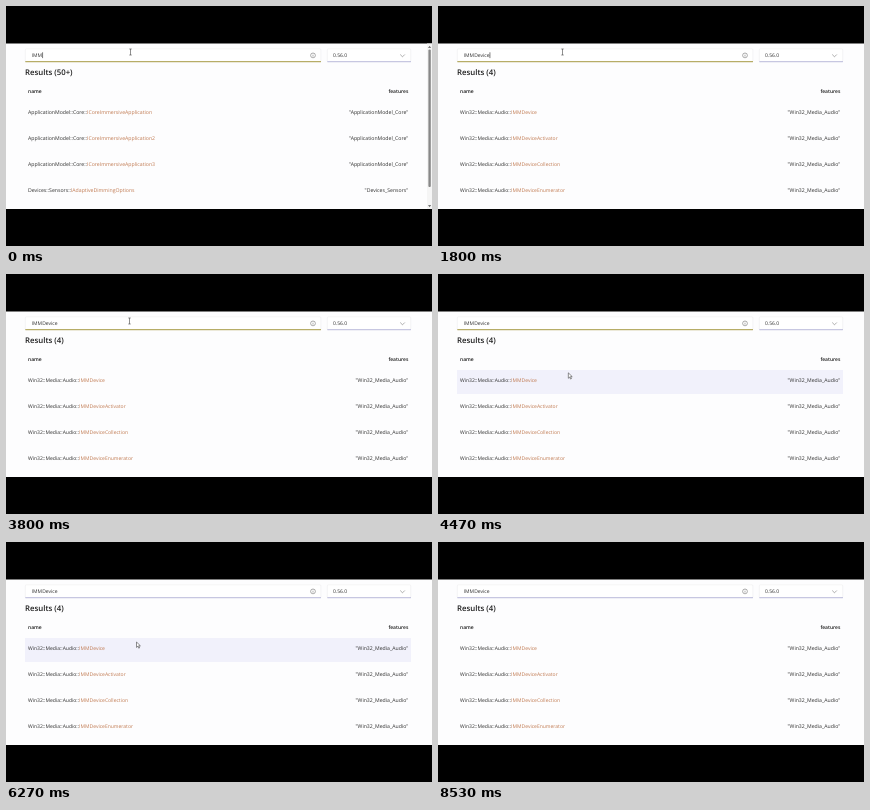
These frames come from a looping animation (426x240 px, 8.59 s). An HTML page:

```html
<!DOCTYPE html>
<html lang="en">
<head>
<meta charset="utf-8">
<title>Feature search</title>
<style>
  html, body { margin: 0; width: 100%; height: 100%; overflow: hidden; background: #000; }
  svg { display: block; width: 100vw; height: 100vh; }
  text {
    font: 400 5.1px "Open Sans", "Noto Sans", sans-serif;
    fill: #303030;
    text-rendering: geometricPrecision;
    white-space: pre;
  }
  .title { font-size: 7.8px; font-weight: 600; fill: #1c1c1c; }
  .head { font-size: 5px; font-weight: 600; fill: #1c1c1c; }
  .end { font-size: 5.17px; text-anchor: end; }
  .head.end { font-size: 4.95px; }
  .hit { fill: #c07a52; }
  .box { fill: #fff; stroke: #ececef; stroke-width: .6; }
  .line { stroke: #bcbcdc; stroke-width: 1; }
  .focus { stroke: #a89c45; }
  .icon { fill: none; stroke: #777; stroke-width: .6; }
</style>
</head>
<body>
<svg viewBox="0 0 426 240">
  <defs><clipPath id="panel"><rect y="37.5" width="426" height="165.5"/></clipPath></defs>
  <rect width="426" height="240"/>
  <g clip-path="url(#panel)">
    <rect y="37" width="426" height="167" fill="#fdfdfe"/>

    <rect class="box" x="19.3" y="42.8" width="295.6" height="13" rx="1"/>
    <path class="line" id="underline" d="M19.3 55.7H315"/>
    <text id="query" x="25.7" y="51.2" style="font-size:5.03px"></text>
    <path id="caret" stroke="#222" stroke-width=".6"/>
    <g class="icon">
      <circle cx="307" cy="49.4" r="2.4"/>
      <path d="M307 49v1.6M307 47.8v.5"/>
    </g>

    <rect class="box" x="321.3" y="42.8" width="83.4" height="13" rx="1"/>
    <path class="line" d="M321.3 55.7H405"/>
    <text x="327" y="51.2" style="font-size:5px">0.56.0</text>
    <path class="icon" d="M394.2 48.5l2.3 2.3 2.3-2.3"/>

    <text class="title" id="count" x="19" y="69"></text>
    <text class="head" x="22" y="87">name</text>
    <text class="head end" x="402.3" y="87">features</text>
    <rect id="hover" x="19" y="96" width="386" height="24" fill="#f1f1fb"/>
    <g id="many"></g>
    <g id="few"></g>

    <g id="scroll">
      <rect x="421" y="37" width="5" height="167" fill="#f5f5f5"/>
      <path d="M422 42l1.6-2.2 1.6 2.2zM422 199l1.6 2.2 1.6-2.2z" fill="#777"/>
      <rect x="422.4" y="43.5" width="2.4" height="137.5" rx="1" fill="#888"/>
    </g>

    <path id="beam" d="M-1.2-3h2.4M-1.2 3h2.4M0-3v6" fill="none" stroke="#444" stroke-width=".6"/>
    <path id="arrow" d="M0 0v5.4l1.3-1.2.9 2 .9-.4-.9-2h1.7z" fill="#fff" stroke="#222" stroke-width=".5"/>
  </g>
</svg>
<script>
const LOOP = 8590, STEP = LOOP / 129;
const KEYS = [130, 250, 370, 490, 600, 720];
const FILTERED = 400, BLUR = 4600, BLINK = 530;
// time, x, y
const PATH = [
  [0, 124.5, 46], [3600, 124.5, 46], [3800, 123.5, 47], [4100, 124, 56],
  [4500, 130.5, 100], [6400, 130.5, 100], [6900, 146, 28], [LOOP, 146, 28]
];
const $ = id => document.getElementById(id);
const show = (id, on) => $(id).style.display = on ? "" : "none";

function fillRows(id, rows, size) {
  $(id).innerHTML = rows.map(([path, item, feature], i) => {
    const y = 108.4 + i * 26;
    return `<text x="22" y="${y}" style="font-size:${size}px">${path}::<tspan class="hit">${item}</tspan></text>
      <text class="end" x="402.3" y="${y}">"${feature}"</text>`;
  }).join("");
}

fillRows("many", [
  ...["", "2", "3"].map(n =>
    ["ApplicationModel::Core", "ICoreImmersiveApplication" + n, "ApplicationModel_Core"]),
  ["Devices::Sensors", "IAdaptiveDimmingOptions", "Devices_Sensors"]
], 5.18);
fillRows("few", ["", "Activator", "Collection", "Enumerator"].map(end =>
  ["Win32::Media::Audio", "IMMDevice" + end, "Win32_Media_Audio"]), 5.04);

function pointer(t) {
  const i = PATH.findIndex(p => p[0] > t);
  const [t0, x0, y0] = PATH[i - 1], [t1, x1, y1] = PATH[i];
  const u = (t - t0) / (t1 - t0), k = u * u * (3 - 2 * u);
  return [x0 + (x1 - x0) * k, y0 + (y1 - y0) * k];
}

function draw(t) {
  const typed = KEYS.filter(k => k <= t).length;
  const query = "IMMDevice".slice(0, 3 + typed);
  $("query").textContent = query;

  const lastKey = typed ? KEYS[typed - 1] : 0;
  const focused = t < BLUR;
  show("caret", focused && Math.floor((t - lastKey) / BLINK) % 2 === 0);
  const caretX = 26.1 + $("query").getComputedTextLength();
  $("caret").setAttribute("d", `M${caretX} 46.3v5.8`);
  $("underline").classList.toggle("focus", focused);

  const few = t >= FILTERED;
  $("count").textContent = few ? "Results (4)" : "Results (50+)";
  show("few", few);
  show("many", !few);
  show("scroll", !few);

  const [x, y] = pointer(t);
  const overInput = y > 42.5 && y < 56;
  show("beam", overInput);
  show("arrow", !overInput);
  show("hover", y >= 96 && y < 120);
  for (const id of ["beam", "arrow"]) $(id).setAttribute("transform", `translate(${x} ${y})`);
}

function frame() {
  const t = performance.now() % LOOP;
  draw(Math.floor(t / STEP) * STEP);
  requestAnimationFrame(frame);
}
frame();
</script>
</body>
</html>
```
